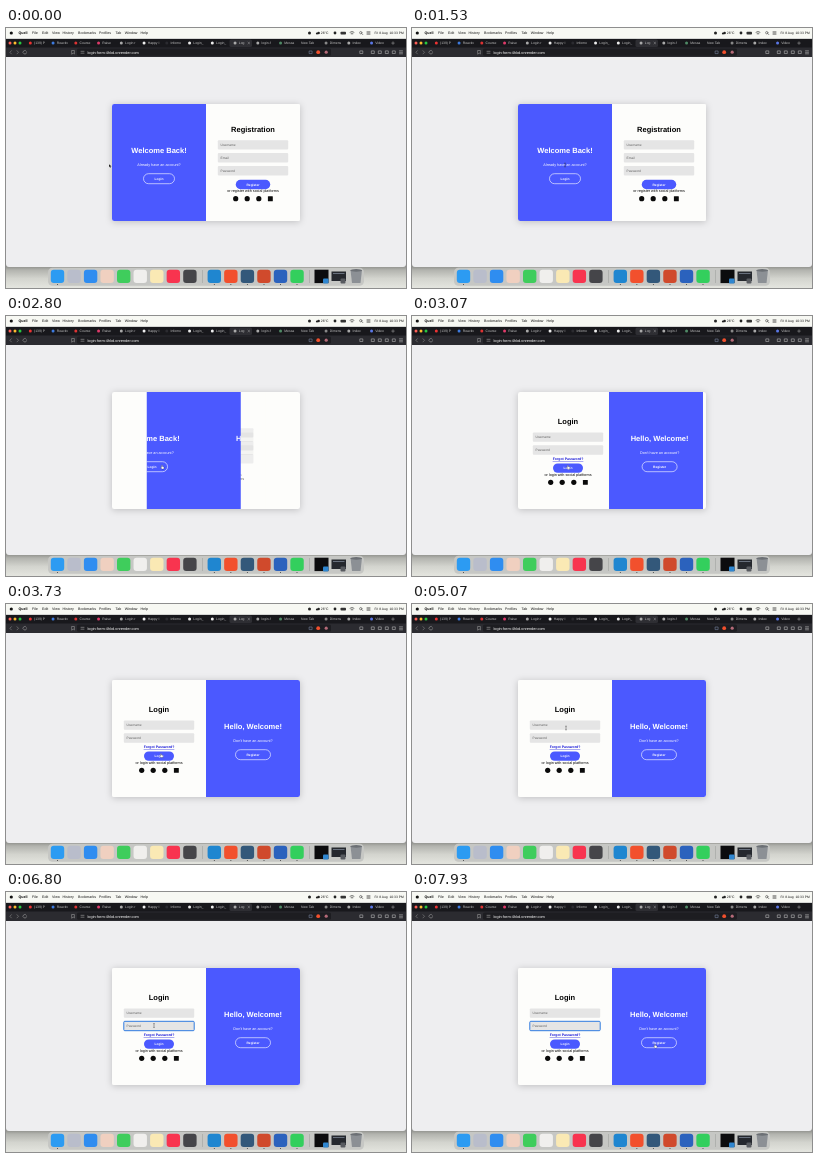
An HTML page for the animation above (8000 ms loop, 400 by 260 pixels).

```html
<!DOCTYPE html>
<html lang="en">
<head>
<meta charset="utf-8">
<title>Login form</title>
<style>
html, body { margin: 0; width: 100%; height: 100%; overflow: hidden; background: #fff; }
svg { display: block; width: 100vw; height: 100vh; font-family: "Liberation Sans", Arial, sans-serif; text-rendering: geometricPrecision; }
</style>
</head>
<body>
<svg id="stage" viewBox="0 0 400 260"></svg>
<script>
const BLUE = '#4b59ff', LOOP = 8000, SLIDE_AT = 2547, SLIDE_MS = 600;
const CARD = { x: 106, y: 76, w: 188, h: 117 }, HALF = CARD.w / 2;
const LEFT = CARD.x + HALF / 2, RIGHT = LEFT + HALF;

const rect = (x, y, w, h, fill, rx = 0, more = '') =>
  `<rect x="${x}" y="${y}" width="${w}" height="${h}" rx="${rx}" fill="${fill}" ${more}/>`;
const dot = (x, y, r, fill) => `<circle cx="${x}" cy="${y}" r="${r}" fill="${fill}"/>`;
const line = (d, color, width = .6) =>
  `<path d="${d}" fill="none" stroke="${color}" stroke-width="${width}" stroke-linecap="round"/>`;
const text = (s, x, y, size, fill = '#000', more = '') =>
  `<text x="${x}" y="${y}" font-size="${size}" fill="${fill}" ${more}>${s}</text>`;
const mid = (s, x, y, size, fill, more = '') =>
  text(s, x, y, size, fill, 'text-anchor="middle" ' + more);
const bold = (s, x, y, size, fill, more = '') => mid(s, x, y, size, fill, 'font-weight="700" ' + more);

function menuBar() {
  const items = [['File', 26], ['Edit', 36], ['View', 46], ['History', 56.5], ['Bookmarks', 72],
    ['Profiles', 93], ['Tab', 109.5], ['Window', 118.7], ['Help', 134.5]];
  return rect(0, 0, 400, 10.6, '#f7f8f3') + dot(5.3, 5, 1.6, '#111') +
    text('Quell', 12.5, 6.3, 3.6, '#000', 'font-weight="700"') +
    items.map(([s, x]) => text(s, x, 6.3, 3.6, '#111')).join('') +
    dot(303.5, 5, 1.5, '#222') +
    dot(311, 5.5, 1.1, '#222') + dot(312.6, 5, 1.3, '#222') + text('26°C', 314.8, 6.3, 3.4, '#111') +
    dot(329, 5, 1.4, '#222') + rect(334.5, 3.7, 5.5, 2.8, '#333', .8) +
    line('M344 4.2q2-1.7 4 0M345 5.4q1-.8 2 0', '#222') + dot(346, 6.4, .4, '#222') +
    line('M355.8 5.6l1.1 1.1M356 4.7a1.2 1.2 0 1 0-2.4 0a1.2 1.2 0 1 0 2.4 0', '#222', .5) +
    line('M361 4h3M361 6h3', '#222', .8) +
    text('Fri 8 Aug&#160; 10:33 PM', 368.5, 6.3, 3.3, '#111');
}

function browserBar() {
  const tabs = [['(139) P', '#e33'], ['Reactiv', '#3d7be0'], ['Course', '#d33'], ['Raise', '#e03a6a'],
    ['Login r', '#aaa'], ['Happy I', '#eee'], ['Infomo', '#2b2b30'], ['Login_', '#eee'], ['Login_', '#eee'],
    ['Log', '#aaa'], ['login-f', '#aaa'], ['Messa', '#4f8a66'], ['New Tab', ''], ['Dimens', '#888'],
    ['Index', '#aaa'], ['Video', '#5b78e8']];
  let out = rect(0, 10.6, 400, 18.4, '#18181c');
  ['#ff5f57', '#febc2e', '#28c840'].forEach((c, i) => out += dot(4 + i * 5, 15, 1.5, c));
  out += rect(223.5, 11.5, 22.5, 7.5, '#2e2e33', 1.5);
  tabs.forEach(([s, icon], i) => {
    const x = 22 + i * 22.75;
    if (icon) out += dot(x + 2.3, 15, 1.5, icon);
    out += text(s, x + (icon ? 6 : 0), 16.3, 3.4, '#c4c4c4');
  });
  out += line('M242 14.2l1.6 1.6M243.6 14.2l-1.6 1.6', '#bbb', .4);
  out += line('M387 13.8v2.6M385.7 15.1h2.6', '#aaa', .5);
  out += rect(0, 19.5, 400, 9.5, '#2b2b30') + rect(71, 20.6, 254, 7.2, '#1d1d21', 1.5);
  out += line('M5.4 22.7l-1.5 1.6l1.5 1.6M11 22.7l1.5 1.6l-1.5 1.6', '#888') +
    line('M20.4 23.3a1.8 1.8 0 1 0 .2 1.4M66 22.5h2.4v3.5l-1.2-1l-1.2 1z', '#aaa', .5) +
    line('M75 23.3h3M75 25.2h3', '#bbb', .5);
  out += text('login-form-4hkd.onrender.com', 81.5, 25.6, 3.85, '#fff');
  out += line('M303.5 23h2.6v2.6h-2.6z', '#8290b0', .5) + dot(312.2, 24.2, 1.9, '#f2502d') +
    dot(320.2, 24.2, 1.6, '#b56a78');
  [355.5, 367, 374, 381, 388].forEach(x => out += line(`M${x - 1.3} 22.9h2.6v2.6h-2.6z`, '#ccc', .5));
  return out + line('M393.5 22.8h3M393.5 24.3h3M393.5 25.8h3', '#ccc', .5);
}

function dock() {
  const apps = ['#2c9bf2', '#b9bdcb', '#2f8df0', '#f0d0c0', '#3fcd5c', '#f0efed', '#fae9b4', '#f8344f', '#454549'];
  const more = ['#1f86d0', '#f2502d', '#33587a', '#d04a2c', '#2b62bd', '#33cf5d'];
  const icon = (c, x) => rect(x - 6.7, 241.7, 13.4, 13.4, c, 3);
  return rect(42, 239.8, 316, 18, '#c6c7c4', 4.5) +
    apps.map((c, i) => icon(c, 51.5 + i * 16.55)).join('') +
    more.map((c, i) => icon(c, 208.3 + i * 16.55)).join('') +
    rect(196, 242, .5, 13, '#999a98') + rect(303.5, 242, .5, 13, '#999a98') +
    [51.5, 208.3, 224.9, 241.4, 258, 274.5, 291].map(x => dot(x, 256.6, .5, '#333')).join('') +
    rect(308.5, 241.7, 14, 13.4, '#0c0c0e') + rect(317, 250.5, 5.5, 5, '#2f86d0', 1) +
    rect(325.5, 243.5, 14.5, 9.5, '#25282e') + rect(327, 245, 11.5, 1, '#68707d') + rect(334.5, 250.5, 5, 5, '#585b60', 1) +
    `<path d="M344.5 242h11.5l-1.5 13h-8.5z" fill="#8c9095"/><ellipse cx="350.2" cy="242.4" rx="5.8" ry="1.3" fill="#6c7075"/>`;
}

// One half of the card: title, input fields, filled button and social icons.
function form(id, cx, title, titleY, fields, fieldY, button, btnW, btnY, extra, note) {
  return `<g id="${id}">` + rect(cx - HALF / 2, CARD.y, HALF, CARD.h, '#fdfdfb') +
    bold(title, cx, titleY, 7.5) +
    fields.map((s, i) => rect(cx - 35.2, fieldY + i * 12.9, 70.4, 9.4, '#e5e5e5', 1) +
      text(s, cx - 32.4, fieldY + 5.8 + i * 12.9, 3.28, '#606060')).join('') + extra +
    rect(cx - btnW / 2, btnY, btnW, 9.4, BLUE, 4.7) + bold(button, cx, btnY + 5.8, 3.28, '#fff') +
    mid(note, cx, btnY + 12.4, 3.75) +
    [-17.3, -5.8, 5.8].map(d => dot(cx + d, btnY + 18.9, 2.6, '#0a0a0a')).join('') +
    rect(cx + 14.9, btnY + 16.5, 4.9, 4.9, '#0a0a0a', .5) + '</g>';
}

function side(id, cx, title, question, button, btnW) {
  return `<g id="${id}">` + bold(title, cx, 124.6, 7.5, '#fff') + mid(question, cx, 138.4, 3.75, '#fff') +
    rect(cx - btnW / 2, 145.7, btnW, 10, 'none', 5, 'stroke="#fff" stroke-width=".6"') +
    bold(button, cx, 151.9, 3.28, '#fff') + '</g>';
}

stage.innerHTML = `<defs>
  <linearGradient id="desk" x2="0" y2="1"><stop stop-color="#777875"/><stop offset=".25" stop-color="#b2b3ae"/>
    <stop offset=".6" stop-color="#d3d4ce"/><stop offset="1" stop-color="#e4e5df"/></linearGradient>
  <clipPath id="cardClip">${rect(CARD.x, CARD.y, CARD.w, CARD.h, '#000', 2.3)}</clipPath>
  <clipPath id="paneClip">${rect(CARD.x, CARD.y, HALF, CARD.h, '#000', 0, 'id="pane"')}</clipPath></defs>` +
  rect(0, 236, 400, 24, 'url(#desk)') +
  rect(0, 200, 400, 39, '#eeeef0', 3) +
  rect(0, 29, 400, 200, '#eeeef0') + browserBar() + menuBar() + dock() +
  rect(CARD.x, CARD.y, CARD.w, CARD.h, '#fdfdfb', 2.3, 'style="filter:drop-shadow(0 1.2px 3.5px #0003)"') +
  '<g clip-path="url(#cardClip)">' +
  form('signIn', LEFT, 'Login', 108, ['Username', 'Password'], 116.4, 'Login', 30, 147.4,
    bold('Forgot Password?', LEFT, 144.2, 3.5, '#1414d8', 'text-decoration="underline"') +
    rect(LEFT - 35.2, 129.3, 70.4, 9.4, 'none', 1, 'id="focus" stroke="#2f7be0" stroke-width="1"'),
    'or login with social platforms') +
  form('signUp', LEFT, 'Registration', 103.6, ['Username', 'Email', 'Password'], 112.2, 'Register', 34.5, 151.8,
    '', 'or register with social platforms') +
  '<g clip-path="url(#paneClip)">' + rect(CARD.x, CARD.y, CARD.w, CARD.h, BLUE) +
  side('welcome', LEFT, 'Welcome Back!', 'Already have an account?', 'Login', 31) +
  side('hello', RIGHT, 'Hello, Welcome!', "Don't have an account?", 'Register', 35) +
  '</g></g><path id="cursor" stroke-linejoin="round"/>';

const el = id => document.getElementById(id);
const move = (id, x, y = 0) => el(id).setAttribute('transform', `translate(${x} ${y})`);

// cubic-bezier(.42, 0, .58, 1)
function easeInOut(x) {
  let lo = 0, hi = 1, u = .5;
  for (let i = 0; i < 20; i++) {
    u = (lo + hi) / 2;
    if (3 * (1 - u) * u * (.42 * (1 - u) + .58 * u) + u ** 3 < x) lo = u; else hi = u;
  }
  return u * u * (3 - 2 * u);
}

// Pointer stops: time, x, y
const stops = [[0, 103, 136], [930, 103, 136], [1530, 153, 137], [2250, 156, 151], [2900, 156, 151],
  [3730, 155, 151.5], [3950, 155, 151.5], [4700, 154, 124], [5300, 154, 124], [6100, 148, 133.5],
  [6900, 148, 133.5], [7750, 243, 154], [LOOP, 243, 154]];
// Cursor looks: path, fill, stroke, stroke width
const looks = {
  arrow: ['M0 0v3.6l.9-.8l.6 1.3l.6-.3l-.6-1.2h1.2z', '#000', '#fff', .3],
  beam: ['M-.8-2q.8 0 .8.5q0-.5.8-.5M0-1.5v3M-.8 2q.8 0 .8-.5q0 .5.8.5', 'none', '#222', .4],
  hand: ['M-.5-1.6q.5-.6 1 0v1.2l1.2.4q.5.3.3.9l-.3 1.2h-1.9l-1.2-1.7q.2-.6.9 0z', '#fff', '#000', .25]
};

function pointer(t) {
  const i = stops.findIndex(s => s[0] > t), [t0, x0, y0] = stops[i - 1], [t1, x1, y1] = stops[i];
  const k = (t - t0) / (t1 - t0), e = k * k * (3 - 2 * k);
  return [x0 + (x1 - x0) * e, y0 + (y1 - y0) * e];
}

function cursorKind(x, y, login) {
  const over = (cx, w, top, bottom) => Math.abs(x - cx) < w / 2 && y > top && y < bottom;
  if (login) {
    if (over(LEFT, 30, 147.4, 156.8) || over(LEFT, 31, 140.5, 145) || over(RIGHT, 35, 145.7, 155.7)) return 'hand';
    return over(LEFT, 70, 116.4, 125.8) || over(LEFT, 70, 129.3, 138.7) ? 'beam' : 'arrow';
  }
  if (over(LEFT, 31, 145.7, 155.7)) return 'hand';
  return over(LEFT, 44, 134.5, 139.5) ? 'beam' : 'arrow';
}

function draw(t) {
  const q = easeInOut(Math.min(1, Math.max(0, (t - SLIDE_AT) / SLIDE_MS))), p = 1 - q;
  el('pane').setAttribute('x', CARD.x + HALF * q);
  move('welcome', -.2 * HALF * q);
  move('hello', .2 * HALF * p);
  move('signIn', HALF * p);
  move('signUp', HALF * p);
  el('signUp').setAttribute('opacity', p < .375 ? 0 : p);
  el('focus').setAttribute('opacity', t > 6300 ? 1 : 0);

  const [x, y] = pointer(t), [d, fill, stroke, width] = looks[cursorKind(x, y, q > .5)];
  move('cursor', x, y);
  Object.entries({ d, fill, stroke, 'stroke-width': width }).forEach(([k, v]) => el('cursor').setAttribute(k, v));
}

const start = performance.now();
function tick() {
  draw((performance.now() - start) % LOOP);
  requestAnimationFrame(tick);
}
tick();
</script>
</body>
</html>
```
